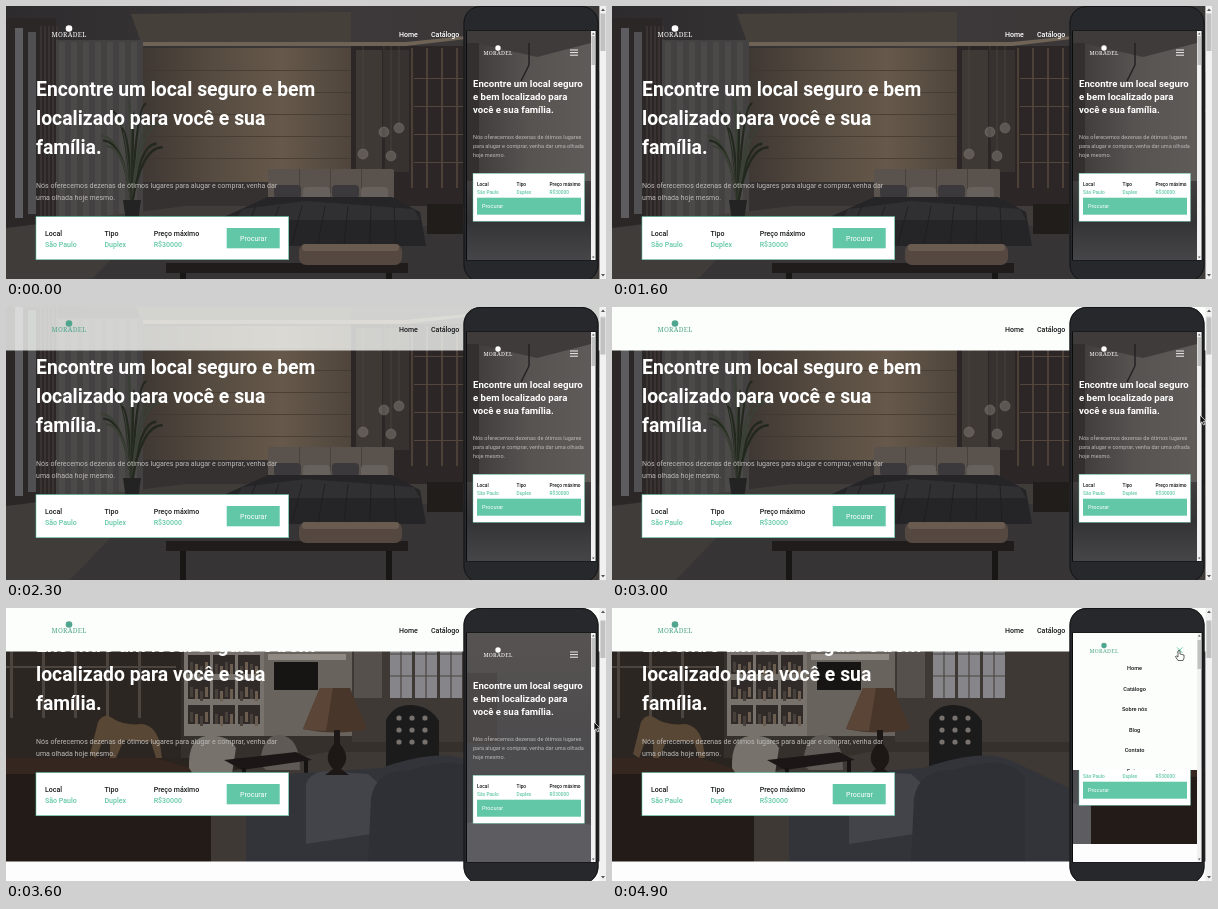
An HTML page that plays this animation: 600x273 px, repeating every 5000 ms.

```html
<!DOCTYPE html>
<html lang="pt">
<head>
<meta charset="utf-8">
<title>Imóveis</title>
<style>
  html, body { margin: 0; width: 100%; height: 100%; overflow: hidden; background: #fff; }
  #stage { display: block; width: 100vw; height: 100vh; font-family: Roboto, sans-serif; }
  .title { font-weight: 700; fill: #fff; }
  .lead { fill: #bcbab8; }
  .label { font-weight: 500; fill: #17191b; }
  .value { font-weight: 500; fill: #62c7a7; }
  .brand { font-family: "Noto Serif", serif; letter-spacing: .3px; }
</style>
</head>
<body>
<svg id="stage" viewBox="0 0 600 273"></svg>
<script>
const LOOP = 5000, STEP = 100, TEAL = '#62c7a7';
const rect = (x, y, w, h, fill, more = '') =>
  `<rect x="${x}" y="${y}" width="${w}" height="${h}" fill="${fill}" ${more}/>`;
const path = (d, fill, more = '') => `<path d="${d}" fill="${fill}" ${more}/>`;
const line = (d, color, width = 1) => path(d, 'none', `stroke="${color}" stroke-width="${width}"`);
const circle = (x, y, r, fill, more = '') => `<circle cx="${x}" cy="${y}" r="${r}" fill="${fill}" ${more}/>`;
const text = (x, y, size, str, cls = '', more = '') =>
  `<text x="${x}" y="${y}" font-size="${size}" class="${cls}" ${more}>${str}</text>`;
const repeat = (n, fn) => Array.from({ length: n }, (_, i) => fn(i)).join('');
const lines = (x, y, gap, size, rows, cls) => rows.map((s, i) => text(x, y + i * gap, size, s, cls)).join('');
const gradient = (id, colors, vertical) => `<linearGradient id="${id}" ${vertical ? 'x2="0" y2="1"' : ''}>
  ${colors.map((c, i) => `<stop offset="${i / (colors.length - 1)}" stop-color="${c}"/>`).join('')}</linearGradient>`;

const bedroom = () => {
  const pendant = (x, y) => line(`M${x} 40V${y}`, '#57504a', .5) +
    circle(x, y + 4, 5, '#7d7671', 'opacity=".55" stroke="#a39b94" stroke-width=".6"');
  return rect(0, 0, 600, 300, '#353130') +
    rect(0, 0, 600, 45, 'url(#ceiling)') +
    path('M125 8L345 6V36H135Z', '#46403a') + path('M135 36H400L460 30V33L400 40H135Z', '#6e6355') +
    rect(0, 12, 50, 230, '#2b2727') + rect(9, 22, 8, 190, '#5d5c60') + rect(22, 26, 8, 182, '#504f52') +
    repeat(5, i => rect(34 + i * 4, 20, 2, 205, '#3a3331')) +
    rect(50, 34, 87, 178, '#434141') + repeat(7, i => rect(53 + i * 12, 36, 6, 174, '#4c4a49')) +
    rect(137, 42, 208, 134, 'url(#wood)') + repeat(5, i => rect(137, 64 + i * 22, 208, .7, '#40372f')) +
    rect(345, 40, 255, 175, '#2c2726') + rect(350, 44, 26, 122, '#3f3935') + rect(379, 44, 24, 122, '#37322f') +
    repeat(4, i => rect(405 + i * 15, 42, 2, 140, '#4c4037')) +
    repeat(4, i => rect(408, 72 + i * 28, 50, 1, '#53473d')) +
    path('M0 222L180 200H600V300H0Z', '#403c3a') + path('M110 248L190 220H460L500 300H60Z', '#363435') +
    repeat(14, i => {
      const a = -2.9 + i * .2, x = 126 + 32 * Math.cos(a), y = 142 + 50 * Math.sin(a) + (i % 3) * 14;
      return line(`M126 198Q${126 + (x - 126) * .3} ${y} ${x} ${y}`, i % 2 ? '#23281f' : '#3a4035', 2.4);
    }) +
    path('M117 194H135L131 222H121Z', '#242323') +
    rect(262, 163, 126, 30, '#5a524c', 'rx="2"') + repeat(3, i => rect(293 + i * 31, 163, .7, 24, '#423c38')) +
    repeat(4, i => rect(268 + i * 29, 179 + i % 2 * 2, 27, 13, i % 2 ? '#67615e' : '#3b393b', 'rx="4"')) +
    path('M220 210L262 191H386L414 206L420 240H200Z', '#252427') +
    path('M236 203L300 195L408 203L414 214L270 214L226 224Z', '#302f32') +
    repeat(7, i => line(`M${250 + i * 23} 200L${234 + i * 26} 238`, '#1d1c1f', .8)) +
    rect(421, 198, 36, 30, '#211d1b') +
    rect(160, 257, 242, 10, '#1f1c1b') + rect(174, 267, 6, 33, '#191716') + rect(380, 267, 6, 33, '#191716') +
    rect(293, 238, 103, 21, '#544840', 'rx="7"') + rect(296, 238, 97, 7, '#6a5b50', 'rx="3"') +
    pendant(357, 144) + pendant(378, 122) + pendant(393, 118) + pendant(385, 146);
};

const livingRoom = () =>
  rect(0, 0, 600, 300, '#35302c') + rect(0, 0, 600, 70, '#413d39') +
  rect(0, 66, 175, 130, '#2c2622') + repeat(5, i => rect(4 + i * 32, 68, 3, 88, '#4c453f')) +
  rect(0, 104, 170, 2, '#4c453f') +
  rect(178, 62, 80, 112, '#77726c') +
  repeat(12, i => rect(182 + i % 3 * 25, 68 + Math.floor(i / 3) * 25, 22, 19, '#302b28') +
    repeat(4, k => rect(184 + i % 3 * 25 + k * 5, 75 + (i + k) % 3 * 2 + Math.floor(i / 3) * 25, 3, 10, k % 2 ? '#6b5e50' : '#48403a'))) +
  rect(258, 64, 88, 110, '#68635d') + rect(262, 92, 78, 6, '#8f8a83') + rect(268, 100, 44, 28, '#171514') +
  rect(268, 70, 50, 18, '#4a4540') +
  rect(346, 60, 254, 120, '#3f3935') +
  repeat(3, i => rect(384 + i * 25, 70, 22, 66, '#85858a') + line(`M${395 + i * 25} 70V136M${384 + i * 25} 92h22m-22 22h22`, '#4c4742', 1.2)) +
  rect(348, 70, 28, 66, '#55504b') +
  path('M0 196H600V300H0Z', '#2a2421') + path('M170 220L320 190H600V300H120Z', '#3e3935') +
  path('M0 196H150L205 212V300H0Z', '#221b18') + path('M0 196H150L205 212H0Z', '#35271f') +
  path('M84 192L92 160Q98 150 106 156Q118 164 136 162Q150 164 154 182L156 196H150L145 180L118 178L110 196H104L104 178L96 180L90 196Z', '#594735') +
  path('M183 206Q182 176 200 174Q222 172 230 186L226 212H187Z', '#77726c') +
  path('M254 202Q256 172 274 173Q294 175 294 208H260Z', '#5f5a56') +
  path('M218 198L290 190L306 198L236 208Z', '#1c1716') + rect(236, 206, 4, 28, '#171312') + rect(298, 198, 4, 26, '#171312') +
  path('M380 204V158Q388 142 406 143T433 159V204Z', '#1c1b1c') +
  repeat(9, i => circle(393 + i % 3 * 13, 156 + Math.floor(i / 3) * 12, 2.6, '#77726e')) +
  path('M240 300V226Q252 208 280 212L375 206Q432 186 461 198L520 226V300Z', '#33343a') +
  path('M300 222Q306 206 330 210L362 212L380 228L365 272L300 282Z', '#43444a') +
  path('M365 236Q370 207 405 208Q460 190 476 216V300H362Z', '#2f3036') +
  path('M314 126H344L361 167Q331 174 297 167Z', '#48362b') + path('M314 126H327L320 169Q308 169 297 167Z', '#5a4537') +
  path('M328 168H334V182Q346 196 335 207L343 213H319L327 207Q316 196 328 182Z', '#1d1816');

// Portrait scenes, drawn in a 124 by 229 box.
const loft = () => rect(0, 0, 124, 229, 'url(#concrete)') +
  path('M0 0H124V12L70 26L0 10Z', '#3f3b3a') + rect(0, 12, 12, 140, '#332f2e') +
  line('M62 12V34M62 34L54 50', '#242223', 1.5) + rect(0, 150, 124, 79, 'url(#slate)');
const lounge = () => rect(0, 0, 124, 229, 'url(#haze)') +
  rect(0, 40, 30, 70, '#4b4746') + path('M0 190Q60 176 124 192V229H0Z', '#5d5d61');

const logo = (id, x, y, size) => `<g id="${id}" fill="#fff">${circle(x, y - 9 * size / 7, size * .5, 'inherit', 'style="fill:inherit"')}
  ${text(x, y, size, 'MORADEL', 'brand', 'text-anchor="middle"')}</g>`;

const field = (x, y, gap, size, name, value) => text(x, y, size, name, 'label') + text(x, y + gap, size, value, 'value');
const fields = (xs, y, gap, size) =>
  [['Local', 'São Paulo'], ['Tipo', 'Duplex'], ['Preço máximo', 'R$30000']]
    .map(([name, value], i) => field(xs[i], y, gap, size, name, value)).join('');

const desktop = `<g id="page">
    <g id="slides"><use href="#bedroom"/><use href="#living" x="593"/><use href="#bedroom" x="1186"/></g>
    ${rect(0, 299.5, 600, 80, '#fdfdfd')}
    ${lines(30, 90, 28.9, 19.35, ['Encontre um local seguro e bem', 'localizado para você e sua', 'família.'], 'title')}
    ${lines(30, 182.3, 11.5, 7.04, ['Nós oferecemos dezenas de ótimos lugares para alugar e comprar, venha dar', 'uma olhada hoje mesmo.'], 'lead')}
    ${rect(30, 210.7, 252.7, 43, '#fff', `stroke="${TEAL}" stroke-width=".6"`)}
    ${fields([39, 98.5, 147.7], 229.5, 11.6, 7.04)}
    ${rect(220.7, 222, 53, 20.3, TEAL)}${text(234, 234.8, 7.04, 'Procurar', '', 'fill="#fff"')}
  </g>
  <rect id="bar" width="594" height="43.5" fill="#fcfefb"/>
  <g id="nav" fill="#fff" font-weight="500">${text(393, 30.7, 7.04, 'Home')}${text(425, 30.7, 7.04, 'Catálogo')}</g>
  <g id="mark">${logo('logo', 63, 31, 6.6)}</g>
  ${rect(593.4, 0, 6.6, 273, '#f1f1f1')}
  <rect id="thumb" x="594.4" y="7.5" width="5" height="37.5" fill="#c1c1c1"/>
  ${path('M595 5L597 2.5L599 5ZM595 268L597 270.5L599 268Z', '#555')}`;

const phoneSlide = (i, scene) => `<use href="#${scene}" x="${461 + i * 124}" y="25"/>`;
const croppedLiving = `<svg x="709" y="25" width="124" height="229" viewBox="0 0 163 300"
  preserveAspectRatio="xMidYMid slice"><use href="#living"/></svg>`;

const menuItems = ['Home', 'Catálogo', 'Sobre nós', 'Blog', 'Contato', 'Entrar'];

const phone = `${rect(457.5, 0, 135, 276, '#26282b', 'rx="17"')}
  ${rect(458, .5, 134, 275, 'none', 'rx="16.5" stroke="#141517"')}
  ${rect(460, 24.5, 130.5, 230, '#0b0c0d')}
  <svg x="461" y="25" width="124" height="229" viewBox="461 25 124 229">
    ${rect(461, 25, 124, 229, '#fdfdfd')}
    <g id="mobilePage">
      <g id="mobileSlides">${phoneSlide(0, 'loft')}${phoneSlide(1, 'lounge')}${croppedLiving}</g>
      ${rect(461, 254, 124, 40, '#fdfdfd')}
      ${lines(467, 80.6, 13.44, 9.6, ['Encontre um local seguro', 'e bem localizado para', 'você e sua família.'], 'title')}
      ${lines(467, 132.8, 9.2, 5.55, ['Nós oferecemos dezenas de ótimos lugares', 'para alugar e comprar, venha dar uma olhada', 'hoje mesmo.'], 'lead')}
      ${rect(467, 167.3, 111.5, 48, '#fff', `stroke="${TEAL}" stroke-width=".4"`)}
      ${fields([471, 510.5, 543.5], 179.5, 8, 4.8)}
      ${rect(471, 191.7, 104, 17, TEAL)}${text(476, 202.2, 5.55, 'Procurar', '', 'fill="#fff"')}
    </g>
    <rect id="mobileBar" x="461" y="25" width="124" height="34" fill="#fcfefb"/>
    <svg id="menu" x="461" y="25" width="124" height="137" viewBox="461 25 124 145" preserveAspectRatio="xMinYMin slice">
      ${rect(461, 25, 124, 145, '#fcfefb')}
      ${menuItems.map((s, i) => text(522.6, 62 + i * 20.55, 5.6, s, 'label', 'text-anchor="middle"')).join('')}
    </svg>
    <g id="mobileMark">${logo('mobileLogo', 492, 49, 5.4)}
      <path id="burger" d="M564 44h8m-8 2.6h8m-8 2.6h8" fill="none" stroke="#fff" stroke-width=".9"/></g>
    <path id="close" d="M565 39.4l5.4 5.4m0-5.4l-5.4 5.4" fill="none" stroke="${TEAL}"/>
  </svg>
  ${rect(585, 25, 4.6, 229, '#f1f1f1')}
  <rect id="mobileThumb" x="585.5" y="30" width="3.6" height="29" fill="#c1c1c1"/>
  ${path('M586 28.5L587.3 26.8L588.6 28.5ZM586 250.5L587.3 252.2L588.6 250.5Z', '#555')}`;

const cursor = `<g id="cursor" stroke="#fff" stroke-width=".7">
  <path id="arrow" d="M0 0V8.6L2 6.8L3.4 10L4.9 9.3L3.5 6.3H6.2Z" fill="#111"/>
  <path id="hand" d="M-1 1Q0 -.6 1 1V4L5 5Q5.6 8 4 10.5H-1L-3.6 6.6Q-3 5.2 -1 7Z" fill="#fff" stroke="#222"/></g>`;

const stage = document.getElementById('stage');
stage.innerHTML = `<defs>
    ${gradient('wood', ['#3f3833', '#564b40', '#66594b', '#4f453b'])}
    ${gradient('ceiling', ['#2d2b2d', '#3d393a', '#393636'])}
    ${gradient('concrete', ['#3d3938', '#575351', '#5f5b59'])}
    ${gradient('slate', ['#403e3e', '#333335', '#464547'], true)}
    ${gradient('haze', ['#575352', '#4c4b4d', '#515155'], true)}
    <g id="bedroom">${bedroom()}</g><g id="living">${livingRoom()}</g>
    <g id="loft">${loft()}</g><g id="lounge">${lounge()}</g>
  </defs>${desktop}${phone}${cursor}`;

const tracks = [];
// Each step is [time in ms, value]; two steps at one time make a hard change.
function track(id, prop, steps) {
  const all = [[0, steps[0][1]], ...steps, [LOOP, steps.at(-1)[1]]];
  const player = document.getElementById(id).animate(
    all.map(([t, value]) => ({ offset: t / LOOP, [prop]: value })), { duration: LOOP, iterations: Infinity });
  player.pause();
  tracks.push(player);
}
const move = (id, steps) => track(id, 'transform', steps.map(([t, x, y]) => [t, `translate(${x}px, ${y}px)`]));
const cut = (id, prop, t, before, after) => track(id, prop, [[t, before], [t, after]]);

move('page', [[1800, 0, 0], [1900, 0, -7], [2000, 0, -18], [2100, 0, -23], [3300, 0, -23], [3400, 0, -31], [3500, 0, -41], [3600, 0, -46]]);
move('thumb', [[1800, 0, 0], [2100, 0, 2.5], [3300, 0, 2.5], [3600, 0, 5]]);
move('slides', [[3000, 0, 0], [3100, -300, 0], [3200, -593, 0], [4600, -593, 0], [4700, -600, 0], [4800, -622, 0], [4900, -656, 0]]);
track('bar', 'opacity', [[2000, 0], [2100, .06], [2200, .4], [2300, .78], [2400, 1]]);
cut('nav', 'fill', 2050, '#fff', '#17191b');
cut('logo', 'fill', 2050, '#fff', '#4fa58d');
move('nav', [[1900, 0, 0], [2100, 0, -6]]);
move('mark', [[1900, 0, 0], [2100, 0, -6]]);

move('mobilePage', [[3600, 0, 0], [3700, 0, -5], [3800, 0, -13], [3900, 0, -18]]);
move('mobileThumb', [[3600, 0, 0], [3900, 0, 2]]);
move('mobileSlides', [[3000, 0, 0], [3100, -62, 0], [3200, -124, 0], [4600, -124, 0], [4700, -140, 0], [4800, -184, 0], [4900, -230, 0]]);
track('mobileBar', 'opacity', [[3850, 0], [4000, .35], [4300, 1]]);
cut('mobileLogo', 'fill', 3950, '#fff', '#4fa58d');
cut('burger', 'stroke', 3950, '#fff', TEAL);
move('mobileMark', [[3800, 0, 0], [4000, 0, -4.5]]);
cut('burger', 'opacity', 4650, 1, 0);
cut('close', 'opacity', 4650, 0, 1);
cut('menu', 'opacity', 4650, 0, 1);
track('menu', 'height', [[4600, '34px'], [4700, '55px'], [4800, '108px'], [4900, '137px']]);

move('cursor', [[2700, 606, 92], [3000, 588, 108], [3200, 588, 114], [3800, 588, 114], [4000, 571, 103], [4400, 567, 42]]);
cut('arrow', 'opacity', 4450, 1, 0);
cut('hand', 'opacity', 4450, 0, 1);

const start = performance.now();
function draw() {
  const time = (performance.now() - start) % LOOP;
  const shown = Math.floor(time / STEP) * STEP;
  for (const player of tracks) player.currentTime = shown;
  requestAnimationFrame(draw);
}
draw();
</script>
</body>
</html>
```
